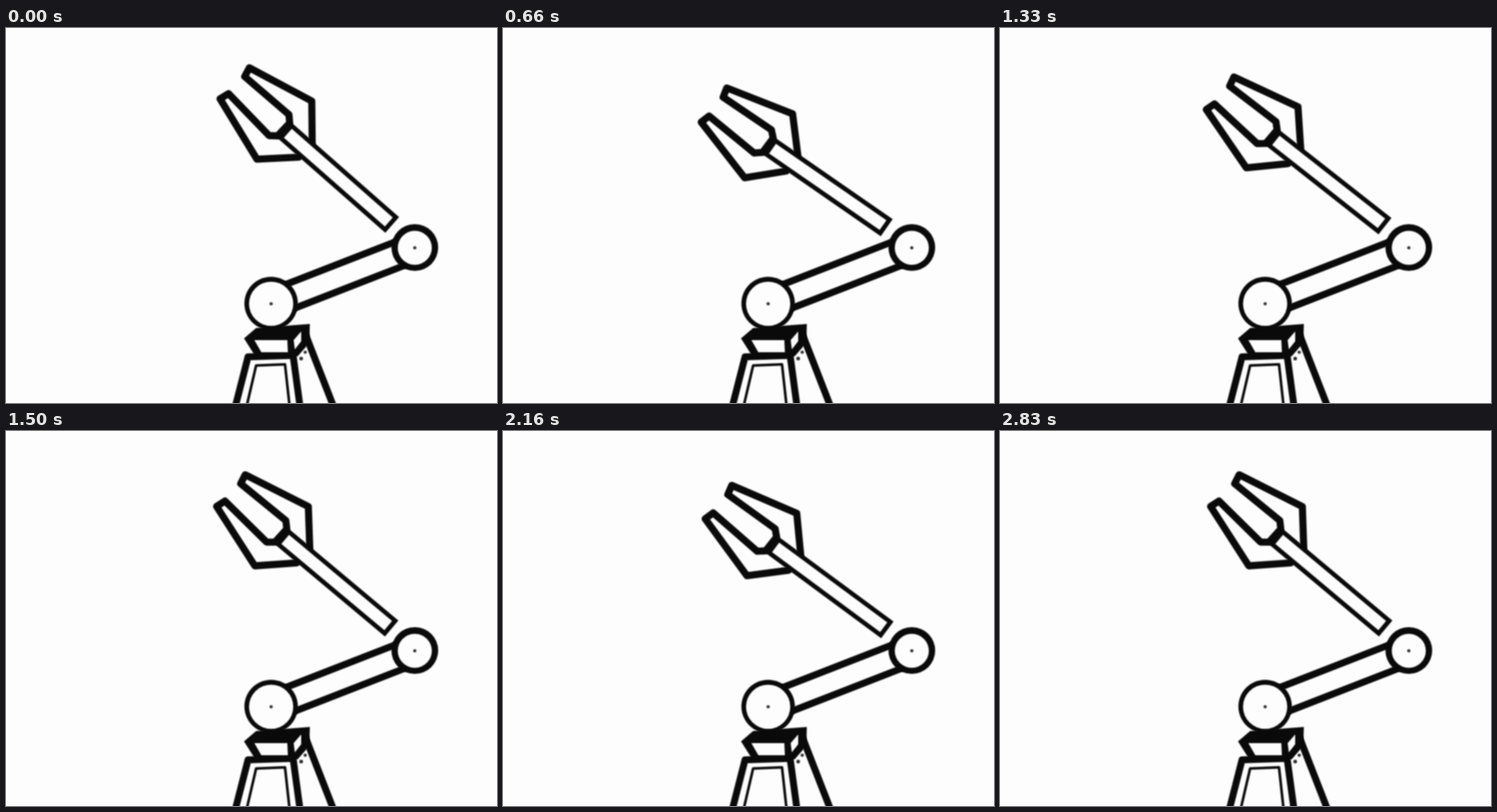
Write an HTML page with a canvas that moves like this. It is 850x650 px and loops after 3000 ms.

```html
<!DOCTYPE html>
<html lang="en">
<head>
<meta charset="utf-8">
<title>Robot arm</title>
<style>
  html, body { margin: 0; width: 100%; height: 100%; overflow: hidden; background: #fdfdfd; }
  canvas { display: block; }
</style>
</head>
<body>
<canvas id="stage" width="850" height="650"></canvas>
<script>
const ctx = document.getElementById('stage').getContext('2d');
const PAPER = '#fdfdfd', INK = '#0a0a0a', GREY = '#303030';
const LOOP = 3000;
const SHOULDER = { x: 459, y: 478 };
const ELBOW = { x: 707.7, y: 381 };
const WRIST = { x: 485, y: 180 };
const SHAFT_ANGLE = 0.721, CLAW_ANGLE = 0.757;

function trace(points) {
  ctx.beginPath();
  points.forEach(([x, y]) => ctx.lineTo(x, y));
}

function line(points, width) {
  trace(points);
  ctx.lineWidth = width;
  ctx.stroke();
}

function shape(points, color) {
  trace(points);
  ctx.fillStyle = color;
  ctx.fill();
}

function disc(x, y, r, color) {
  ctx.beginPath();
  ctx.arc(x, y, r, 0, Math.PI * 2);
  ctx.fillStyle = color;
  ctx.fill();
}

function joint({ x, y }, outer, inner) {
  disc(x, y - 0.5, outer, INK);
  disc(x, y, inner, PAPER);
  disc(x, y, 2.8, GREY);
}

// Runs paint with the origin at a point and the x axis turned by an angle
function within({ x, y }, angle, paint) {
  ctx.save();
  ctx.translate(x, y);
  ctx.rotate(angle);
  paint();
  ctx.restore();
}

function drawBase() {
  line([[518, 530], [567, 656]], 12);
  line([[397, 656], [419, 570], [497, 567.5], [509, 656]], 12);
  line([[416.5, 656], [433, 585], [483, 583], [491, 656]], 4.5);

  shape([[412, 538], [433, 520], [526, 513], [525, 546], [505, 569], [431, 568]], INK);
  shape([[430, 541], [487, 541], [488, 562], [442, 562]], PAPER);
  shape([[498, 541], [511, 526], [511, 543], [500, 557]], PAPER);

  disc(518, 562, 2.8, GREY);
  disc(511, 573, 3.2, GREY);
}

function drawUpperArm() {
  const dx = ELBOW.x - SHOULDER.x, dy = ELBOW.y - SHOULDER.y;
  within(SHOULDER, Math.atan2(dy, dx), () => {
    for (const side of [-1, 1]) line([[30, 22 * side], [Math.hypot(dx, dy) - 20, 22 * side]], 12);
  });
  joint(SHOULDER, 46.3, 38.3);
  joint(ELBOW, 40.5, 29.5);
}

function drawClaw() {
  const half = [[46, 17], [-4.4, 69.2], [-122.5, 37], [-118, 20.3], [-17, 25], [-6, 15.3]];
  const mirrored = half.map(([x, y]) => [x, -y]).reverse();
  line([...half, ...mirrored], 12.3);
}

function drawShaft() {
  ctx.lineJoin = 'miter';
  ctx.lineWidth = 7.8;
  ctx.beginPath();
  ctx.rect(0, -14.2, 240.5, 28.4);
  ctx.fillStyle = PAPER;
  ctx.fill();
  ctx.stroke();
}

function drawForearm(tilt) {
  within(ELBOW, -tilt, () => {
    ctx.translate(-ELBOW.x, -ELBOW.y);
    within(WRIST, CLAW_ANGLE, drawClaw);
    within(WRIST, SHAFT_ANGLE, drawShaft);
  });
}

// Six steps per second, held on whole hundredths; one full swing, then a shorter one
function levelAt(ms) {
  const step = Math.ceil((Math.floor(ms / 10) + 1) * 3 / 50) - 1;
  return step < 10 ? 5 - Math.abs(5 - step) : 4 - Math.abs(14 - step);
}

// A steady turn that stops at both ends of the swing
function tiltAt(level) {
  return Math.min(0.1335, Math.max(0, 0.0305 * level - 0.007));
}

function draw(level) {
  ctx.filter = 'none';
  ctx.fillStyle = PAPER;
  ctx.fillRect(0, 0, 850, 650);
  ctx.filter = 'blur(0.9px)';
  ctx.strokeStyle = INK;
  ctx.lineJoin = ctx.lineCap = 'round';
  drawBase();
  drawUpperArm();
  drawForearm(tiltAt(level));
}

const start = performance.now();
let shown = -1;

function tick() {
  const level = levelAt((performance.now() - start) % LOOP);
  if (level !== shown) {
    draw(level);
    shown = level;
  }
  requestAnimationFrame(tick);
}

tick();
</script>
</body>
</html>
```
